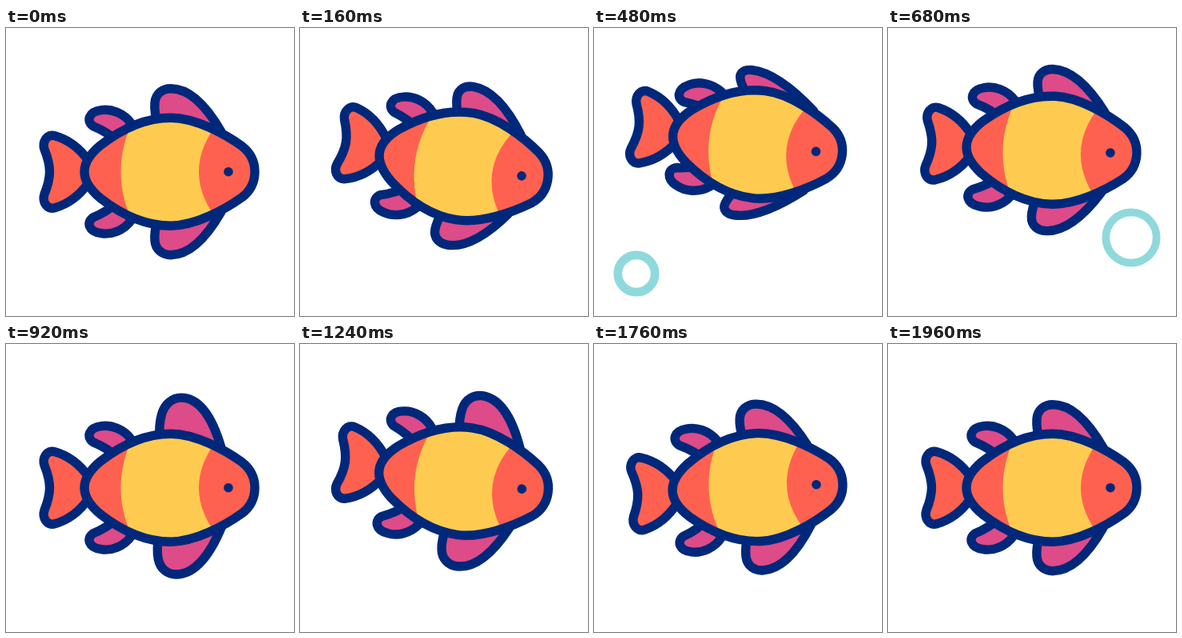
Recreate the animation shown at these times as an HTML page. Size 360 by 360 pixels, loop 2 s.

```html
<!DOCTYPE html>
<html lang="en">
<head>
<meta charset="utf-8">
<title>Swimming fish</title>
<style>
html, body { margin: 0; width: 100%; height: 100%; overflow: hidden; background: #fff; }
svg { display: block; width: 100%; height: 100%; }
.line { stroke: #00287a; stroke-width: 11.4; stroke-linejoin: round; vector-effect: non-scaling-stroke; }
.red { fill: #ff6150; }
.pink { fill: #dd4b88; }
.yellow { fill: #fecb50; }
.bubble { fill: none; stroke: #8fd9dc; }
</style>
</head>
<body>
<svg viewBox="0 0 360 360">
  <defs>
    <path id="body" d="M-107 0C-107 -13 -99 -23 -87 -33C-60 -54 -31 -67.5 1 -67.5C32 -67.5 69 -47 90 -32C101 -23.5 106 -13 106 0C106 13 101 23.5 90 32C69 47 32 67.5 1 67.5C-31 67.5 -60 54 -87 33C-99 23 -107 13 -107 0Z"/>
    <path id="fin" class="line pink" d="M-15 -58Q-20 -75 -19 -86C-18 -98 -9 -104 1 -104C26 -104 48 -78 64 -50Z"/>
    <path id="rear" class="line pink" d="M-48 -60C-58 -74 -74 -79 -86 -77C-102 -75 -105 -63 -96 -57C-84 -52 -74 -46 -66 -38Z"/>
    <clipPath id="inside"><use href="#body"/></clipPath>
  </defs>
  <circle class="bubble" id="left"/>
  <circle class="bubble" id="right"/>
  <g id="fish">
    <path id="tail" class="line red" d="M-102 -14C-112 -28 -126 -40 -144 -45C-154 -48 -160 -37 -157 -28C-153 -18 -150.5 -9 -150.5 0C-150.5 9 -153 18 -157 28C-160 37 -154 48 -144 45C-126 40 -112 28 -102 14Z"/>
    <use href="#rear"/>
    <use href="#rear" transform="scale(1 -1)"/>
    <use href="#fin" id="finTop"/>
    <g transform="scale(1 -1)"><use href="#fin" id="finLow"/></g>
    <use href="#body" class="red"/>
    <path class="yellow" clip-path="url(#inside)" d="M-42 -72Q-81 0 -42 72H69Q3 0 69 -72Z"/>
    <use href="#body" class="line" fill="none"/>
    <circle cx="73" r="5.8" fill="#00287a"/>
  </g>
</svg>
<script>
const LOOP = 2000, STEP = 40;
const set = (id, attrs) => {
  for (const name in attrs) document.getElementById(id).setAttribute(name, attrs[name]);
};

// turning points of each motion: time and value
const tilt = { 0: 0, 200: 10.4, 920: 0, 1200: 7.8, 1640: -3.8, 1960: 0, 2000: 0 };
const rise = { 0: 0, 560: -36, 920: 0, 1500: -14, 1800: 0, 2000: 0 };
const spread = { 0: 0, 440: -1.2, 940: .8, 1600: 0, 2000: 0 };

// cosine swing from one turning point to the next
function swing(keys, t) {
  const times = Object.keys(keys).map(Number);
  const i = times.findIndex(time => time > t);
  const from = times[i - 1], to = times[i];
  const p = (1 - Math.cos(Math.PI * (t - from) / (to - from))) / 2;
  return keys[from] + (keys[to] - keys[from]) * p;
}

// leans and stretches a fin above its root
const lean = k =>
  `translate(0 -50) matrix(1 0 ${-.3 * k} ${1 + .2 * k} 0 0) translate(0 50)`;

// rises while the hole catches up with the rim
function bubble(id, x, y, start, t) {
  const p = Math.min(1, Math.max(0, (t - start) / 320));
  const outer = 39 * (1 - (1 - p) ** 2.8), inner = 39 * p ** .8;
  set(id, {
    cx: x, cy: y - 80 * p,
    r: (outer + inner) / 2,
    "stroke-width": Math.max(0, outer - inner)
  });
}

function draw(t) {
  const angle = swing(tilt, t), k = swing(spread, t);
  set("fish", { transform: `translate(205 ${179.7 + swing(rise, t)}) rotate(${angle})` });
  set("tail", { transform: `translate(0 ${-.55 * angle})` });
  set("finTop", { transform: lean(k) });
  set("finLow", { transform: lean(Math.min(k, k / 2)) });
  set("rear", { transform: `rotate(${16 * Math.min(k, 0)} -49 -44)` });
  bubble("left", 53, 337, 360, t);
  bubble("right", 304, 312, 480, t);
}

const began = performance.now();
function tick() {
  const t = (performance.now() - began) % LOOP;
  draw(Math.floor(t / STEP) * STEP);
  requestAnimationFrame(tick);
}
tick();
</script>
</body>
</html>
```
